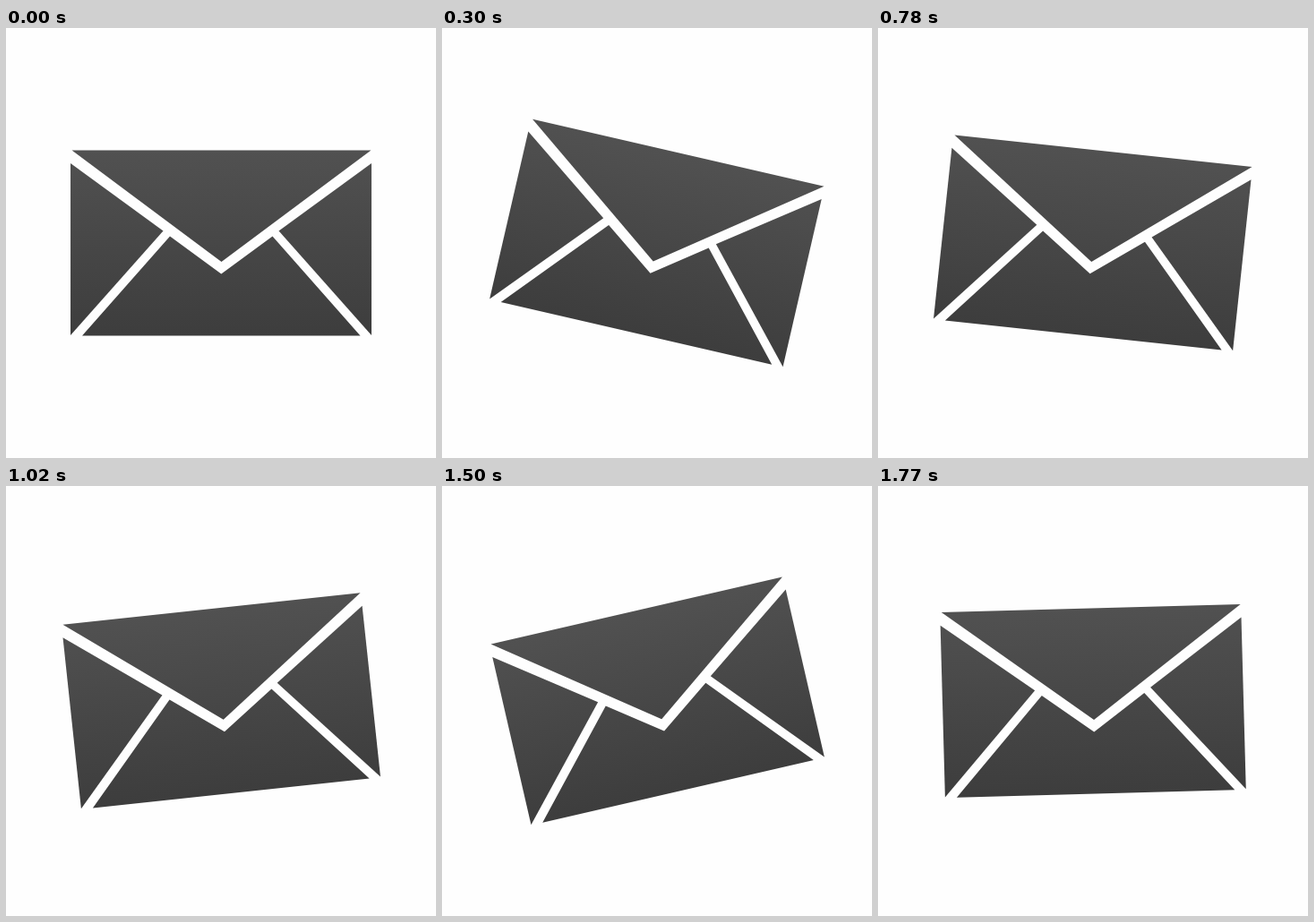
Animation, 480 px wide and 480 px high, one loop 1.8 s. Source, as an HTML page without scripts:

```html
<!DOCTYPE html>
<html lang="en">
<head>
<meta charset="utf-8">
<title>Rocking envelope</title>
<style>
  @property --phase {
    syntax: "<angle>";
    inherits: false;
    initial-value: 0deg;
  }
  html, body {
    margin: 0;
    width: 100%;
    height: 100%;
    overflow: hidden;
    background: #fefefe;
  }
  svg {
    display: block;
    width: 100%;
    height: 100%;
  }
  /* sine swing, held for 30 ms per pose */
  .envelope {
    transform-origin: 240px 240px;
    transform: rotate(calc(sin(var(--phase)) * 15deg));
    animation: rock 1800ms steps(60, end) infinite;
  }
  @keyframes rock {
    from { --phase: 0deg; }
    to { --phase: 360deg; }
  }
</style>
</head>
<body>
<svg viewBox="0 0 480 480">
  <defs>
    <linearGradient id="shade" gradientUnits="userSpaceOnUse" x1="0" y1="136.5" x2="0" y2="343.5">
      <stop offset="0" stop-color="#515151"/>
      <stop offset="1" stop-color="#3d3d3d"/>
    </linearGradient>
  </defs>
  <g class="envelope" fill="url(#shade)">
    <path d="M73.5 136.5H407.5L240.5 261Z"/>
    <path d="M72 151L175.5 226.5L72 343Z"/>
    <path d="M408 151L304.5 226.5L408 343Z"/>
    <path d="M85 343.5L183 232.5L240.3 274.5L297.5 232.5L395.5 343.5Z"/>
  </g>
</svg>
</body>
</html>
```
